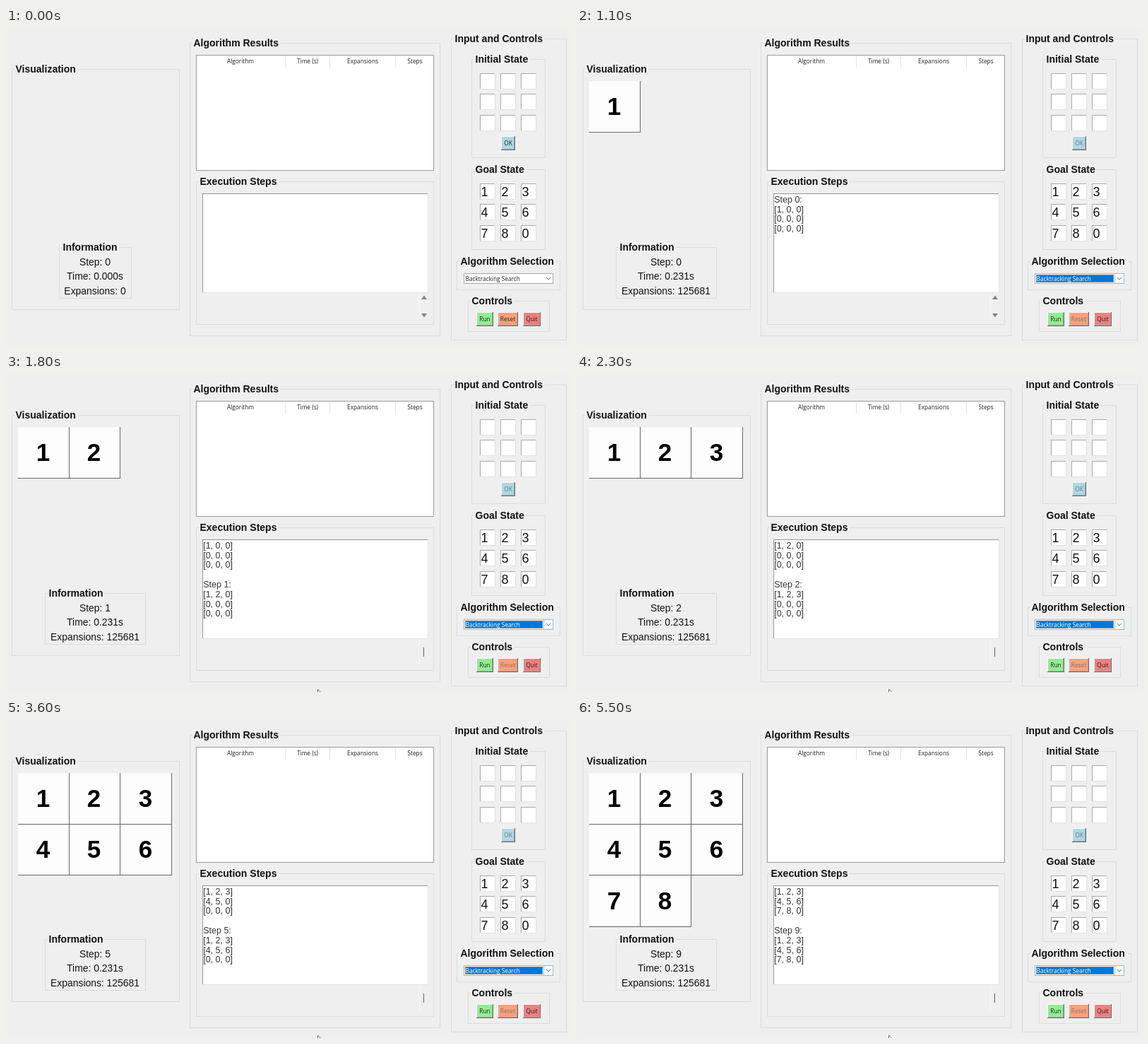
Animation, 800 px wide and 450 px high, one loop 5600 ms. Source, as an HTML page with a canvas:

```html
<!DOCTYPE html>
<html lang="en">
<head>
<meta charset="utf-8">
<title>8-puzzle solver</title>
<style>
html, body { margin: 0; width: 100%; height: 100%; overflow: hidden; background: #efefef; }
canvas { display: block; }
</style>
</head>
<body>
<canvas id="stage" width="800" height="450"></canvas>
<script>
const ctx = document.getElementById('stage').getContext('2d');
const LOOP = 5600, TICK = 100;
const FIRST_STEP = 850, STEP_TIME = 510;
const BG = '#efefef', BLUE = '#0078d7';
const SANS = '"Liberation Sans", Arial, sans-serif';
const TITLE = `bold 14px ${SANS}`;
const UI = '8.3px "Open Sans", "Noto Sans", sans-serif';

function rect(x, y, w, h, color) {
  ctx.fillStyle = color;
  ctx.fillRect(x, y, w, h);
}

function text(str, x, y, font, color = '#111', align = 'left') {
  ctx.font = font;
  ctx.fillStyle = color;
  ctx.textAlign = align;
  ctx.fillText(str, x, y);
}

// Box with separate colours for its top-left and bottom-right edges
function bevel(x, y, w, h, fill, light, dark) {
  rect(x, y, w, h, dark);
  rect(x, y, w - 1, h - 1, light);
  rect(x + 1, y + 1, w - 2, h - 2, fill);
}

function poly(points, fill, stroke) {
  ctx.beginPath();
  points.forEach(([x, y]) => ctx.lineTo(x, y));
  if (fill) {
    ctx.closePath();
    ctx.fillStyle = fill;
    ctx.fill();
  }
  if (stroke) {
    ctx.strokeStyle = stroke;
    ctx.lineWidth = 1;
    ctx.stroke();
  }
}

function group(title, left, top, right, bottom) {
  ctx.strokeStyle = '#dedddd';
  ctx.lineWidth = 1;
  ctx.strokeRect(left + 0.5, top + 0.5, right - left, bottom - top);
  ctx.font = TITLE;
  rect(left + 4, top - 1, ctx.measureText(title).width + 4, 3, BG);
  text(title, left + 5.5, top + 5, TITLE);
}

function button(label, x, y, w, color, { disabled, pressed } = {}) {
  const shift = pressed ? 1 : 0;
  if (pressed) bevel(x, y, w, 20, '#f0f0f0', '#696969', '#fff');
  else {
    bevel(x, y, w, 20, '#a4a4a4', '#f8f8f8', '#6c6c6c');
    rect(x + 1, y + 1, w - 3, 17, color);
  }
  text(label, x + w / 2 + shift, y + 13 + shift, UI, disabled ? '#77777a' : '#222', 'center');
}

function entries(top, digits) {
  for (let i = 0; i < 9; i++) {
    const x = 671 + 29.2 * (i % 3) | 0, y = top + 29.7 * (i / 3 | 0) | 0;
    bevel(x, y, 22, 23, '#fff', '#aaa', '#e2e2e2');
    if (digits) text(digits[i], x + 1.5, y + 17.5, `18px ${SANS}`);
  }
}

// Row texts of the board after the given step
function rows(step) {
  return [0, 3, 6].map(start => {
    const cells = [1, 2, 3].map(n => n + start <= Math.min(step + 1, 8) ? n + start : 0);
    return `[${cells.join(', ')}]`;
  });
}

function visualization(step) {
  group('Visualization', 8, 58, 245, 398);
  // Last tile first, so that each dark edge stays above the next tile
  for (let i = Math.min(step, 7); i >= 0; i--) {
    const x = 17 + Math.floor(72.5 * (i % 3)), y = 75 + Math.floor(72.5 * (i / 3 | 0));
    bevel(x, y, 73, 73, '#fdfdfd', '#f9f9f9', '#666');
    text(i + 1, x + 35.5, y + 48, `bold 35px ${SANS}`, '#000', 'center');
  }
  const started = step >= 0;
  if (started) group('Information', 55, 310, 197, 382);
  else group('Information', 75, 310, 177, 382);
  const lines = [
    `Step: ${Math.max(step, 0)}`,
    `Time: ${started ? '0.231' : '0.000'}s`,
    `Expansions: ${started ? 125681 : 0}`
  ];
  lines.forEach((line, i) => text(line, 126, 336 + 20.4 * i, `13.9px ${SANS}`, '#111', 'center'));
}

function results() {
  group('Algorithm Results', 260, 21, 614, 435);
  bevel(269, 38, 337, 164, '#fff', '#989a9e', '#989a9e');
  [395, 458, 551].forEach(x => rect(x, 39, 1, 17, '#e4e4e4'));
  [['Algorithm', 332], ['Time (s)', 427], ['Expansions', 505], ['Steps', 579]]
    .forEach(([label, x]) => text(label, x, 50, UI, '#222', 'center'));
}

function execution(step) {
  group('Execution Steps', 269, 217, 605, 419);
  bevel(278, 234, 320, 141, '#fff', '#959595', '#e4e4e4');
  if (step >= 0) {
    const lines = [`Step ${step}:`, ...rows(step)];
    if (step > 0) lines.unshift(...rows(step - 1), '');
    lines.forEach((line, i) => text(line, 279.2, 246.7 + 13.8 * i, `12.5px ${SANS}`, '#333'));
  }
  rect(585, 376, 1, 36, '#f8f8f8');
  if (step > 0) rect(591, 387, 1, 13, '#606060');
  else {
    poly([[588, 384], [592, 378.5], [596, 384]], '#858585');
    poly([[588, 404], [592, 409.5], [596, 404]], '#858585');
  }
}

function selection(focused) {
  const edge = focused ? '#8ebbe0' : '#a9a9a9';
  bevel(648, 347, 127, 15, '#fff', edge, edge);
  if (focused) {
    rect(650, 349, 110, 11, BLUE);
    ctx.setLineDash([1, 1]);
    ctx.strokeStyle = '#d8925a';
    ctx.strokeRect(650.5, 349.5, 109, 10);
    ctx.setLineDash([]);
    rect(761, 347, 1, 15, '#9cc5e8');
  }
  text('Backtracking Search', 650.5, 357.8, UI, focused ? '#fff' : '#222');
  poly([[765, 353], [768, 356], [771, 353]], null, '#666');
}

function controls(step, t) {
  const disabled = step >= 0;
  group('Input and Controls', 630, 15, 793, 441);
  group('Initial State', 659, 44, 763, 183);
  entries(64, null);
  button('OK', 701, 153, 20, '#add8e6', { disabled });
  group('Goal State', 659, 200, 763, 313);
  entries(220, '123456780');
  group('Algorithm Selection', 638, 330, 784, 370);
  selection(t >= 200);
  group('Controls', 654, 386, 769, 429);
  button('Run', 666, 402, 24, '#90ee90', { pressed: t >= 600 && !disabled });
  button('Reset', 696, 402, 29, '#ffa07a', { disabled });
  button('Quit', 732, 402, 25, '#f08080');
}

function cursor(t) {
  let x, y;
  if (t >= 200 && t < 900) {
    const toRun = Math.min((t - 200) / 300, 1), away = Math.max((t - 600) / 200, 0);
    x = 700 - 22 * toRun - 26 * away;
    y = 357 + 55 * toRun + 29 * away;
  } else if (t >= 1400) {
    x = 441.5;
    y = 446;
  } else return;
  const shape = [[0, 0], [0, 11], [2.6, 8.7], [4.4, 12.5], [6, 11.8], [4.3, 8.2], [7.7, 8]];
  poly([...shape, [0, 0]].map(([dx, dy]) => [x + dx, y + dy]), '#fff', '#666');
}

function draw(now) {
  const t = Math.floor(now % LOOP / TICK) * TICK;
  const step = Math.floor((t - FIRST_STEP) / STEP_TIME);
  rect(0, 0, 800, 450, BG);
  visualization(step);
  results();
  execution(step);
  controls(step, t);
  cursor(t);
}

const start = performance.now();
function frame() {
  draw(performance.now() - start);
  requestAnimationFrame(frame);
}
frame();
</script>
</body>
</html>
```
